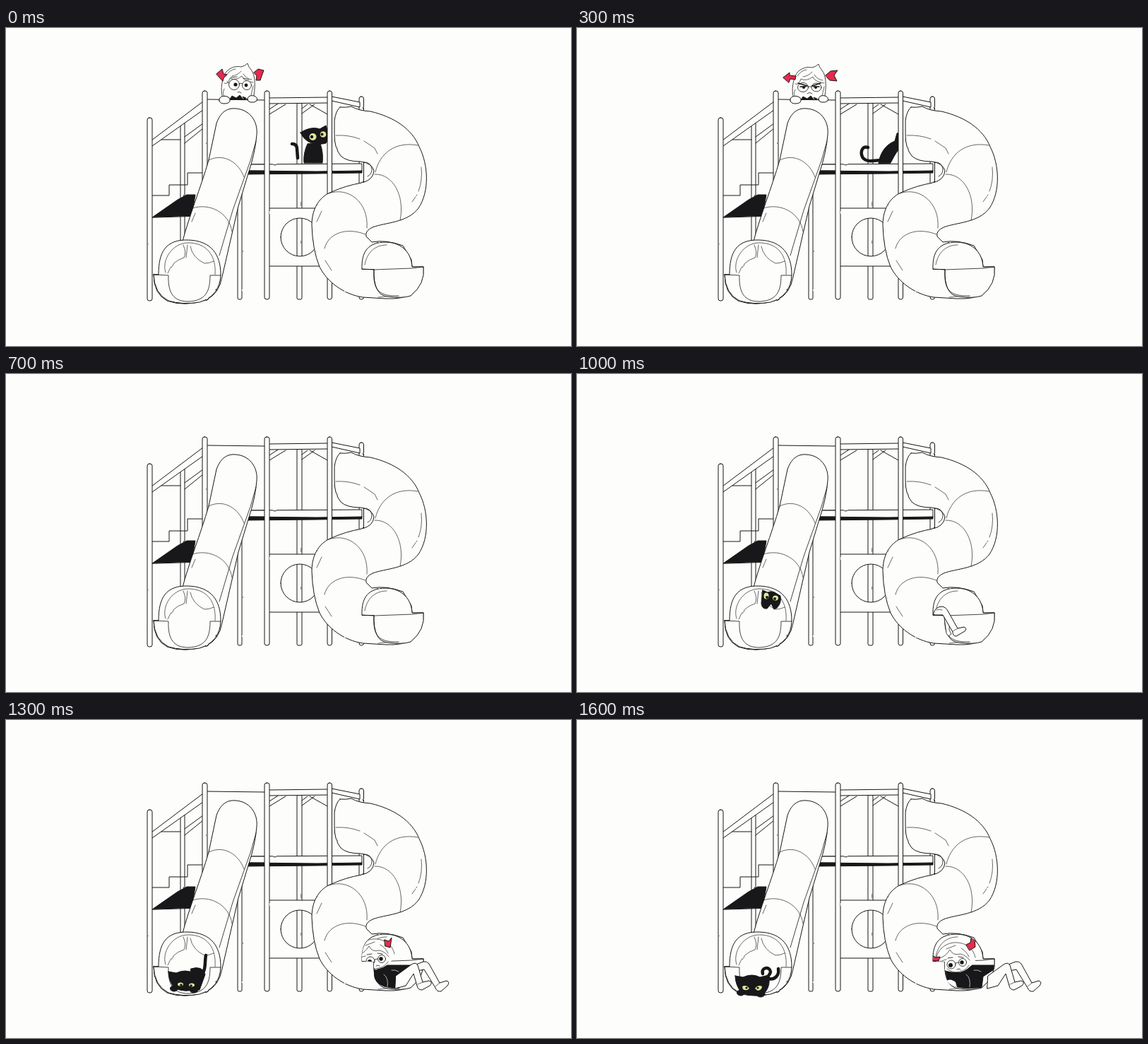
Write an HTML page that moves like this. It is 800 by 450 pixels and loops after 1.7 s.

```html
<!DOCTYPE html>
<html lang="en">
<head>
<meta charset="utf-8">
<title>Two slides</title>
<style>
  html, body { margin: 0; width: 100%; height: 100%; overflow: hidden; background: #fdfdfb; }
  svg { display: block; width: 100vw; height: 100vh; fill: #fdfdfb; stroke: #161616; stroke-width: 1; stroke-linejoin: round; stroke-linecap: round; }
  .line { fill: none; }
  .fine { fill: none; stroke-width: .65; }
  .thin { stroke-width: .8; }
  .bare { stroke: none; }
  .rough { filter: url(#pen); }
  .ink { fill: #18181a; stroke: #18181a; }
  .dot { fill: #161616; stroke: none; }
  .red { fill: #e62a4d; }
  .eye { fill: #e3e59a; stroke: none; }
  .tail { fill: none; stroke: #18181a; stroke-width: 4.5; }
  .pose { visibility: hidden; animation: show 1.7s step-end infinite; animation-delay: calc(var(--t) * 100ms - 1700ms); }
  .long { animation-name: hold; }
  @keyframes show { 0% { visibility: visible } 5.882%, 100% { visibility: hidden } }
  @keyframes hold { 0% { visibility: visible } 11.764%, 100% { visibility: hidden } }
</style>
</head>
<body>
<svg viewBox="0 0 800 450">
<defs>
  <filter id="pen" color-interpolation-filters="sRGB">
    <feTurbulence type="fractalNoise" baseFrequency=".09" numOctaves="2" seed="4"/>
    <feDisplacementMap in="SourceGraphic" scale="1.6" xChannelSelector="R" yChannelSelector="G"/>
  </filter>
  <clipPath id="aboveWall"><path d="M270 30H385V102H270Z"/></clipPath>
  <clipPath id="mouth"><path d="M504 341C503 318 512 304 538 303C562 304 574 320 575 338H591L590 362L572 379Q524 384 521 362V342Z"/></clipPath>

  <g id="hands">
    <path d="M302 103C301 98 306 96 311 96.500Q318 98 317 103Q316 107 309 107Q303 107 302 103Z"/>
    <path d="M342 101C342 96 347 95 351 96Q357 98 355 103Q352 106 346 105Q342 104 342 101Z"/>
  </g>
  <g id="hair">
    <path class="thin" d="M308 101C303 92 305 77 309 67C313 57 324 53 333 55Q338 54 342 50Q343 55 347 59C354 67 353 87 350 100Z"/>
    <path class="fine" d="M309 78Q314 81 317 71Q325 75 334 68Q336 75 350 77M320 68Q328 67 333 61M336 65Q340 72 348 73M312 67Q317 59 325 58M309 86Q306 92 309 97M350 82L347 95"/>
  </g>
  <path id="collar" class="ink" d="M316 102L320 96L326 99L331 95L337 102ZM338 102L335 97L340 99Z"/>
  <g id="curious" class="thin">
    <use href="#hair"/>
    <circle cx="323" cy="80" r="7.500"/><circle cx="341" cy="81" r="6.500"/>
    <path class="line" d="M330 79Q333 77 335 79M313 76L316 78M318 70L327 69M336 71L344 73M328 91Q331 89 333 92"/>
    <circle class="dot" cx="325" cy="80" r="2.600"/><circle class="dot" cx="340" cy="81" r="2.400"/>
    <use href="#collar"/>
  </g>
  <g id="angry" class="thin">
    <use href="#hair"/>
    <ellipse cx="320" cy="83" rx="7.500" ry="6.500"/><ellipse cx="339" cy="83" rx="7" ry="6"/>
    <path class="line" stroke-width="1.600" d="M313 77L326 81M345 77L333 81M316 82H324M335 82H343"/>
    <path class="line" d="M327 82H332M326 92Q329 89 333 92"/>
    <circle class="dot" cx="321" cy="83" r="2"/><circle class="dot" cx="338" cy="83" r="2"/>
    <use href="#collar"/>
  </g>
  <g id="arrows" class="red">
    <path d="M292 70L301 63V67L310 68L309 73L302 72L300 77Z"/>
    <path d="M352 67L359 61L369 60L364 67L368 75L358 74Z"/>
  </g>
  <g id="bows" class="red">
    <path d="M298 65L306 58L308 65L313 66L308 71L307 75Z"/>
    <path d="M351 63L357 58L365 60L362 68L360 74L354 74L355 68Z"/>
  </g>

  <g id="sitCat">
    <path class="tail" d="M405 164Q412 164 412 171L413 184"/>
    <path class="ink" d="M427 164C423 172 421 182 422 191H448C449 181 448 172 445 164Z"/>
    <path class="ink" d="M417 148C426 142 436 140 444 143L453 138C457 148 457 158 453 163C438 167 424 163 417 148Z"/>
    <circle class="eye" cx="434.500" cy="154" r="5"/><circle class="eye" cx="449" cy="150.500" r="4.300"/>
  </g>

  <g id="legs">
    <path d="M588 351L611 342Q616 341 619 345L634 372L644 369Q649 371 645 376L636 384Q630 385 628 379L612 353L598 356Z"/>
    <path d="M572 362L594 346Q600 342 603 347L610 371L619 369Q625 371 620 376L609 382Q603 382 602 376L597 359L586 376L571 380Z"/>
    <path class="fine" d="M603 374L610 371M628 377L634 372"/>
  </g>
  <g id="torso">
    <path class="ink" d="M519 349L538 354L552 347L589 347L587 354L573 363L571 379L550 383L524 375Z"/>
    <path d="M521 369Q527 365 534 371L536 378H526Z" class="bare"/>
    <path class="fine" stroke="#fdfdfb" d="M549 360Q556 365 554 378M560 354Q565 353 570 356"/>
  </g>
  <g id="face" class="thin">
    <path class="bare" d="M506 343C506 326 514 315 531 313C550 311 564 324 562 339Q551 353 540 355Q516 356 506 343Z"/>
    <path class="fine" d="M506 338C508 324 517 315 531 313C547 312 559 320 562 334M511 335Q520 333 526 323Q530 332 541 329Q549 331 554 338M521 322L534 317M542 321Q550 326 553 333M509 343Q514 338 521 337M522 350Q530 357 540 354Q549 352 553 345"/>
    <circle cx="528" cy="344" r="6"/><circle cx="544" cy="341" r="5.500"/>
    <path class="line" d="M534 342L538 341M523 335L530 334M538 333L545 334M536 351Q539 349 541 351"/>
    <circle class="dot" cx="527" cy="345" r="3"/><circle class="dot" cx="543" cy="341" r="2.700"/>
  </g>

  <g id="catHead">
    <path class="ink" d="M224 362L235 364Q248 358 259 364L271 361Q275 375 266 386Q248 393 232 385Q224 374 224 362Z"/>
    <ellipse class="ink" cx="232" cy="386" rx="5.500" ry="4"/><ellipse class="ink" cx="260" cy="388" rx="6" ry="4"/>
  </g>
</defs>

<!-- back structure -->
<g class="rough">
  <path d="M247 130V303H253V126Z"/>
  <path class="line" d="M217 158H247M207 237H231V222H257V205H284M253 154L279 135M253 163L279 142"/>
  <path class="ink" d="M207 268L243 243L256 236H268L263 266Z"/>
  <path d="M206 159L279 104V116L207 167Z"/>
  <rect x="412" y="106" width="7" height="278" rx="2"/>
  <rect x="500" y="97" width="6.500" height="287" rx="3"/>
  <path class="line" d="M373 122L396 108M373 115L385 107M419 121L437 108M419 114L427 108M430 108L455 122"/>
  <path d="M372 99L456 98V106L372 107ZM461 97L501 105L501 112L461 103Z"/>
  <path class="ink" d="M338 201H504V205L440 206L338 207Z"/>
  <path d="M340 193L504 192V202L440 203L340 202Z"/>
  <path fill-rule="evenodd" d="M372 255H446V337H372ZM389 296a27 27 0 1 0 54 0a27 27 0 1 0-54 0Z"/>
</g>

<!-- cat on the platform -->
<g class="pose" style="--t:0"><use href="#sitCat"/><circle class="dot" cx="433" cy="154" r="2.200"/><circle class="dot" cx="447.500" cy="150.500" r="2"/></g>
<g class="pose" style="--t:1"><use href="#sitCat"/><circle class="dot" cx="436" cy="154" r="2.200"/><circle class="dot" cx="450.500" cy="150.500" r="2"/></g>
<g class="pose" style="--t:2">
  <path class="tail" d="M405 168Q401 178 410 185L426 188"/>
  <path class="ink" d="M423 191C424 177 432 166 442 160L440 148L449 151L460 145V168C452 174 448 182 447 191Z"/>
</g>
<g class="pose" style="--t:3">
  <path class="tail" d="M412 169C402 166 401 178 405 184Q410 189 418 188L431 187"/>
  <path class="ink" d="M427 191C429 177 437 165 450 160L453 149L460 147V168C452 174 448 184 444 191Z"/>
</g>
<g class="pose" style="--t:4">
  <path class="tail" d="M438 166Q431 176 441 180Q449 181 460 172"/>
  <path class="ink" d="M460 158Q452 163 450 172L460 178Z"/>
</g>

<g class="rough">
  <!-- front posts and wall -->
  <path class="bare" d="M284 101L366 102V192H284Z"/>
  <path class="line" d="M284 101L366 102"/>
  <rect x="328" y="200" width="6" height="184" rx="2"/>
  <rect x="200" y="127" width="7" height="259" rx="3"/>
  <rect x="278" y="89" width="7" height="130" rx="3"/>
  <path class="bare" d="M334 193H366V201H334Z"/>
  <path class="line" d="M340 193H366M344 202H366"/>
  <rect x="366" y="89" width="7" height="295" rx="3"/>
  <rect x="455" y="89" width="6.500" height="295" rx="3"/>

  <!-- straight slide -->
  <path d="M250 302C258 270 276 225 287 187L298 135C304 118 314 113 325 114C344 115 357 131 355 151Q353 176 343 206L329 252L306 352Q302 376 283 385Q253 395 228 386Q209 376 209 349H217Z"/>
  <path class="thin line" d="M354 160L346 188L321 258L302 322"/>
  <path class="fine" d="M287 187C309 176 330 191 337 211M264 255C288 247 316 261 320 288M268 262L263 274"/>
  <path d="M209 349H216C216 317 226 299 258 300C291 301 304 321 304 349Q303 379 274 388Q250 392 230 386Q210 376 209 349Z"/>
  <path class="thin line" d="M209 349L230 350C229 376 238 387 258 387C282 386 289 374 289 350H304"/>
  <path class="fine" d="M226 346C220 329 235 304 258 304C286 304 298 324 296 349M257 307L255 325M261 309Q264 325 281 333Q288 333 294 330M251 307Q256 318 252 325Q235 330 229 347"/>

  <!-- spiral slide -->
  <path d="M473 112Q480 113 489 111Q499 117 516 118C550 126 575 143 585 168C598 193 600 231 584 255C568 276 537 275 519 282Q508 287 510 295L518 303Q538 299 562 308L574 328L575 338H591Q593 360 575 376Q562 384 538 383L505 381C479 377 455 360 444 338Q434 314 433 279C433 254 445 238 461 232Q481 223 504 219Q520 215 521 202Q518 191 502 189Q482 189 474 181Q465 170 465 151V131Q467 117 473 112Z"/>
  <path class="thin line" d="M506 190Q517 189 518 200Q518 207 512 210"/>
  <path class="fine" d="M523 204C529 178 550 160 583 166M522 207C549 206 565 239 558 272M457 234C485 224 514 247 511 283M451 312C456 291 481 281 509 292M467 152Q485 151 501 157M507 160L522 170L526 178M588 197Q590 216 584 231M582 236L575 246M447 259L440 274M452 329L461 343M527 381L554 378"/>
  <path d="M504 341C503 316 513 303 538 303C563 304 574 320 575 338L591 338Q594 362 573 379Q561 383 540 380Q520 378 521 342Z"/>
  <path class="thin line" d="M504 341L521 342L575 340L591 338M521 342C519 371 528 380 556 379"/>
  <path class="fine" d="M508 335C511 318 522 307 539 307"/>
</g>

<!-- girl above the wall -->
<g clip-path="url(#aboveWall)">
  <g class="pose" style="--t:0"><use href="#curious"/><use href="#bows"/></g>
  <g class="pose" style="--t:1"><use href="#curious" y="1"/><use href="#bows" x="-1" y="2"/></g>
  <g class="pose" style="--t:2"><use href="#angry" y="-1"/><use href="#arrows" y="-2"/></g>
  <g class="pose" style="--t:3"><use href="#angry" y="1"/><use href="#arrows"/></g>
  <g class="pose" style="--t:4"><use href="#angry" y="5"/><use href="#arrows" y="7"/></g>
  <g class="pose" style="--t:5"><use href="#angry" y="21"/>
    <path class="red" d="M291 91L300 86L301 89L307 91L301 93L300 97L292 95Z"/>
    <path class="red" d="M353 88L360 82L371 81L369 88L368 93L358 94Z"/></g>
</g>
<g class="pose" style="--t:0"><use href="#hands"/></g>
<g class="pose" style="--t:1"><use href="#hands"/></g>
<g class="pose" style="--t:2"><use href="#hands"/></g>
<g class="pose" style="--t:3"><use href="#hands"/></g>
<g class="pose" style="--t:4"><use href="#hands"/></g>
<g class="pose" style="--t:5"><use href="#hands"/></g>
<g class="pose" style="--t:6"><path d="M303 102Q302 96 309 96Q316 96 317 102ZM342 102Q343 95 349 95Q355 97 355 102Z"/></g>

<!-- sliding out -->
<g class="pose long" style="--t:10">
  <path class="ink" d="M263 306L270 309Q277 306 283 311L288 314Q290 324 283 331L279 333L275 325L269 332Q262 333 261 325Z"/>
  <ellipse class="eye" cx="268" cy="314" rx="3.500" ry="4.500"/><ellipse class="eye" cx="281" cy="317" rx="4" ry="3.500"/>
  <circle class="dot" cx="269" cy="316" r="2"/><circle class="dot" cx="280" cy="318" r="2"/>
  <path class="thin" d="M520 345L523 367L526 371L530 368L527 362L528 342Z"/>
  <path d="M505 338Q508 329 517 329Q523 330 526 337L539 360L548 358Q553 360 549 364L537 371Q532 371 532 365L518 341L506 341Z"/>
  <path class="fine" d="M532 364L539 360M509 334Q513 332 517 334"/>
</g>
<g class="pose" style="--t:12">
  <path class="tail" stroke-width="4" d="M279 337C285 326 280 319 273 311"/>
  <path class="ink" d="M244 342L254 348C258 338 268 332 279 335C286 343 281 356 284 366L283 378L276 377L272 373Q264 378 255 375L248 379Q241 375 247 366Q247 352 244 342Z"/>
  <ellipse class="eye" cx="254" cy="366" rx="4.500" ry="3.500"/><ellipse class="eye" cx="269" cy="368" rx="4.500" ry="3.500"/>
  <circle class="dot" cx="255" cy="367" r="2.400"/><circle class="dot" cx="268" cy="369" r="2.400"/>
  <g clip-path="url(#mouth)">
    <path class="ink" d="M505 336L520 333L534 335L547 344L540 357L530 375L521 368Z"/>
    <path class="bare" d="M503 335L506 316Q514 312 521 320L518 334Z"/>
    <path class="fine" d="M506 317Q515 313 521 321M507 324L518 320M509 337Q515 334 518 328"/>
    <circle class="thin" cx="511" cy="328" r="3.500"/><circle class="dot" cx="512" cy="328" r="1.800"/>
  </g>
  <use href="#legs" x="-40" y="1"/>
  <path d="M538 345Q541 341 547 343Q551 347 547 351Q541 353 538 350Z"/>
</g>
<g class="pose" style="--t:13">
  <path class="tail" d="M274 362C284 358 281 342 283 333"/>
  <path class="ink" d="M262 352Q278 347 282 360L274 382L258 380Z"/>
  <use href="#catHead" x="6" y="-6"/>
  <ellipse class="eye" cx="247" cy="374" rx="4" ry="2.500"/><ellipse class="eye" cx="263" cy="375" rx="4" ry="2.500"/>
  <circle class="dot" cx="248" cy="375" r="1.800"/><circle class="dot" cx="262" cy="376" r="1.800"/>
  <g clip-path="url(#mouth)"><use href="#torso" x="-14"/><use href="#face" x="-12" y="-3"/>
    <path class="red" d="M536 311L542 313L546 308L544 322L537 320Z"/></g>
  <use href="#legs" x="-20"/>
</g>
<g class="pose" style="--t:14">
  <path class="tail" d="M266 361C286 365 292 347 283 341Q275 338 271 345"/>
  <use href="#catHead"/>
  <path class="fine" stroke="#fdfdfb" d="M228 372Q248 382 268 370M237 386L240 383M256 384L261 383"/>
  <g clip-path="url(#mouth)"><use href="#torso"/><use href="#face"/>
    <path class="red" d="M543 318L549 316L551 309L555 316L553 325L546 324ZM503 333L509 335L506 342L503 341Z"/></g>
  <use href="#legs"/>
</g>
<g class="pose" style="--t:15">
  <path class="tail" d="M264 361C281 366 287 351 277 346Q268 344 266 351"/>
  <use href="#catHead"/>
  <path class="eye" d="M235 380Q240 376 244 381ZM252 381Q257 376 261 380Z"/>
  <g clip-path="url(#mouth)"><use href="#torso" x="1"/><use href="#face" x="1" y="1"/>
    <path class="red" d="M548 317L555 316L556 309L561 312L562 322L553 325ZM503 333L513 337L506 342L503 341Z"/></g>
  <use href="#legs" x="5"/>
</g>
<g class="pose" style="--t:16">
  <path class="tail" stroke-width="4" d="M263 359C260 350 273 348 274 356C274 361 268 362 272 366C279 368 287 362 285 352"/>
  <use href="#catHead"/>
  <path class="eye" d="M234 377Q240 374 244 380Q240 384 235 381ZM252 380Q256 374 262 377Q262 382 256 383Z"/>
  <circle class="dot" cx="240" cy="379" r="1.600"/><circle class="dot" cx="256" cy="379" r="1.600"/>
  <g clip-path="url(#mouth)"><use href="#torso" x="2"/><use href="#face" x="2" y="2"/>
    <path class="red" d="M551 318L557 315L558 308L563 311L564 321L556 326ZM503 333L508 336L514 335L512 341H503Z"/></g>
  <use href="#legs" x="10"/>
</g>
</svg>
</body>
</html>
```
